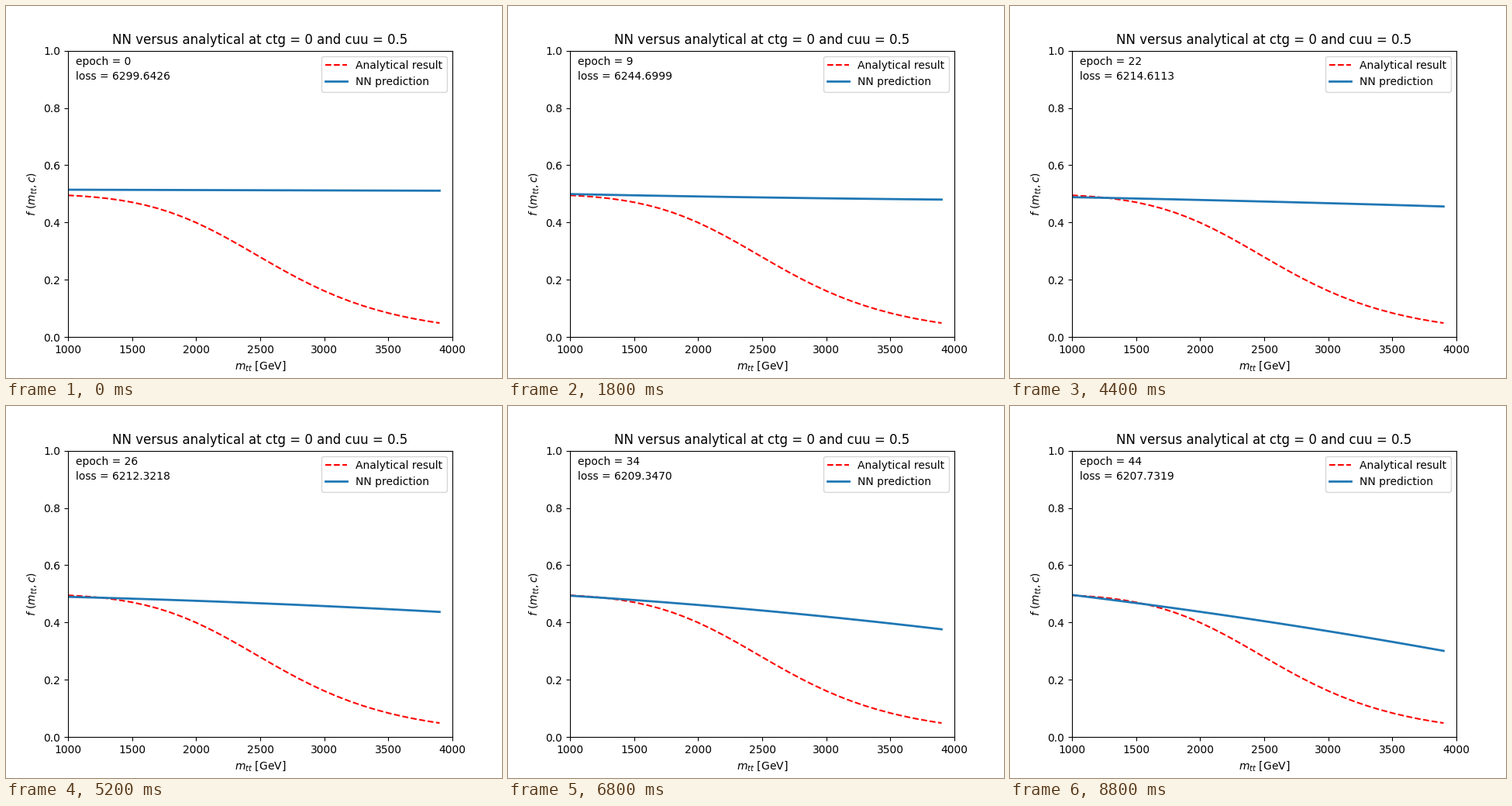
Write a matplotlib script that moves like this. It is 640 px wide and 480 px high and loops after 9000 ms.

```python
import numpy as np
import matplotlib.pyplot as plt
from matplotlib.animation import FuncAnimation

EPOCHS = 45
INTERVAL = 200

plt.rcParams["font.family"] = "DejaVu Sans"

mass = np.arange(1000, 4000, 100)
span = (mass - mass[0]) / (mass[-1] - mass[0])

# Checkpoints of the training run: epoch, loss, prediction at the last mass
epochs, losses, ends = np.array([
    (0, 6299.6426, 0.511),
    (5, 6265.8687, 0.491),
    (14, 6225.9326, 0.470),
    (22, 6214.6113, 0.456),
    (30, 6211.0708, 0.411),
    (38, 6208.0576, 0.341),
    (44, 6207.7319, 0.301),
]).T


def smooth(x, knots, values):
    """Cubic Hermite curve through the knots."""
    slopes = np.gradient(values, knots)
    i = np.clip(np.searchsorted(knots, x, side="right") - 1, 0, len(knots) - 2)
    h = knots[i + 1] - knots[i]
    t = (x - knots[i]) / h
    return ((1 + 2 * t) * (1 - t) ** 2 * values[i]
            + t * (1 - t) ** 2 * h * slopes[i]
            + t ** 2 * (3 - 2 * t) * values[i + 1]
            + t ** 2 * (t - 1) * h * slopes[i + 1])


def analytical(m):
    x = m / 1000
    return 1 / (2 + 0.0205 * x ** (4.22 + 0.57 * np.log(x)))


def prediction(epoch):
    # The left end settles like a damped swing
    start = 0.4945 + 0.02 * np.exp(-epoch / 19) * np.cos(np.pi * epoch / 24)
    end = smooth(epoch, epochs, ends)
    # The line sags briefly, then arches upwards
    sag = 0.005 * np.exp(-((epoch - 14) / 5) ** 2)
    arch = 0.0095 / (1 + np.exp((26 - epoch) / 3))
    return start + (end - start) * span + 4 * (arch - sag) * span * (1 - span)


fig, ax = plt.subplots(figsize=(6.4, 4.8), dpi=100)
ax.plot(mass, analytical(mass), "r--", label="Analytical result")
nn_line, = ax.plot(mass, prediction(0), color="C0", lw=2, label="NN prediction")
epoch_text = ax.text(1060, 0.95, "")
loss_text = ax.text(1060, 0.90, "")
ax.set_xlim(1000, 4000)
ax.set_ylim(0, 1)
ax.set_title("NN versus analytical at ctg = 0 and cuu = 0.5")
ax.set_xlabel(r"$m_{tt}$ [GeV]")
ax.set_ylabel(r"$f$ ($m_{tt}, c$)")
ax.legend(loc="upper right")


def update(epoch):
    nn_line.set_ydata(prediction(epoch))
    epoch_text.set_text(f"epoch = {epoch}")
    loss_text.set_text(f"loss = {smooth(epoch, epochs, losses):.4f}")
    return nn_line, epoch_text, loss_text


anim = FuncAnimation(fig, update, frames=EPOCHS, interval=INTERVAL, repeat=True)
plt.show()
```
